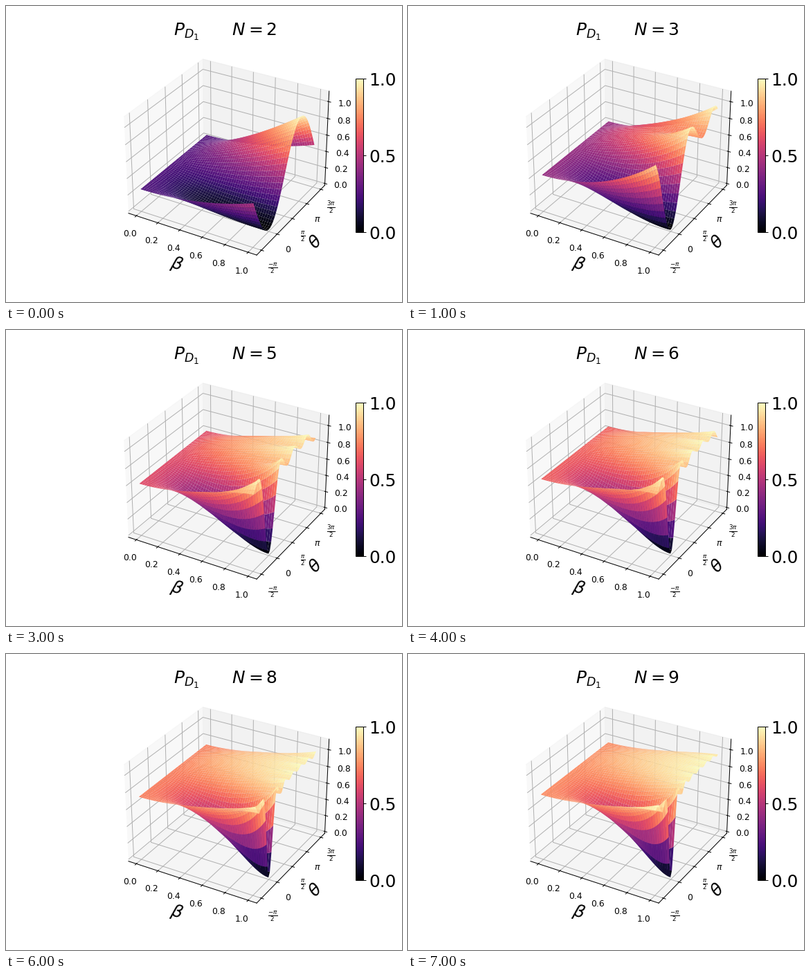
Recreate the animation shown at these times as a matplotlib script. Size 572 by 428 pixels, loop 8000 ms.

```python
import numpy as np
import matplotlib.pyplot as plt
from matplotlib.animation import FuncAnimation
from matplotlib.cm import ScalarMappable
from matplotlib.colors import Normalize

W, H, DPI = 572, 428, 89.375
SIDE = 0.77 * H      # the 3D axes are square
CENTER_X = 316.9
PI = np.pi

beta, theta = np.meshgrid(np.linspace(0, 1, 50),
                          np.linspace(-PI / 2, 3 * PI / 2, 50))


def detection(n):
    """Probability of detector D1 after n weak beam splitters.

    The second arm is damped by beta and shifted by theta on each pass.
    """
    c, s = np.cos(PI / (2 * n)), np.sin(PI / (2 * n))
    arm = beta * np.exp(1j * theta)
    a, b = np.ones_like(arm), np.zeros_like(arm)
    for _ in range(n):
        a, b = c * a - s * b, arm * (s * a + c * b)
    return np.abs(a) ** 2


def padded(lo, hi, margin=0.0):
    """Limits with a data margin and the 1/48 border around the box."""
    d = (hi - lo) * margin
    lo, hi = lo - d, hi + d
    edge = (hi - lo) / 48
    return lo - edge, hi + edge


def px_rect(left, top, width, height):
    return [left / W, 1 - (top + height) / H, width / W, height / H]


fig = plt.figure(figsize=((W + 1e-6) / DPI, (H + 1e-6) / DPI), dpi=DPI,
                 facecolor="white")
ax = fig.add_axes(px_rect(CENTER_X - SIDE / 2, 0.12 * H, SIDE, SIDE),
                  projection="3d")
ax.view_init(elev=30, azim=-60)
ax.set_xticks(np.linspace(0, 1, 6))
ax.set_yticks(np.arange(-1, 4) * PI / 2)
ax.set_yticklabels([r"$\frac{-\pi}{2}$", "0", r"$\frac{\pi}{2}$",
                    r"$\pi$", r"$\frac{3\pi}{2}$"])
ax.set_zticks(np.linspace(0, 1, 6))
ax.set_xlabel(r"$\beta$", fontsize=20)
ax.set_ylabel(r"$\theta$", fontsize=20)
ax.set_xlim(*padded(0, 1, 0.05))
ax.set_ylim(*padded(-PI / 2, 3 * PI / 2, 0.05))
ax.set_zlim(*padded(0, 1.1))

norm = Normalize(0, 1)
cax = fig.add_axes(px_rect(504.6, 105.4, 11.1, 221.6))
bar = fig.colorbar(ScalarMappable(norm, "magma"), cax=cax, ticks=[0, 0.5, 1])
bar.ax.set_yticklabels(["0.0", "0.5", "1.0"])
bar.ax.tick_params(labelsize=20)

title = fig.text(CENTER_X / W, 1 - 43 / H, "", fontsize=20,
                 ha="center", va="baseline")
surfaces = []


def draw(i):
    n = i + 2
    while surfaces:
        surfaces.pop().remove()
    surfaces.append(ax.plot_surface(beta, theta, detection(n),
                                    cmap="magma", norm=norm))
    title.set_text(r"$P_{D_1}$" + " " * 6 + f"$N = {n}$")
    return surfaces + [title]


anim = FuncAnimation(fig, draw, frames=8, interval=1000, repeat=True,
                     repeat_delay=0, blit=False)
plt.show()
```
